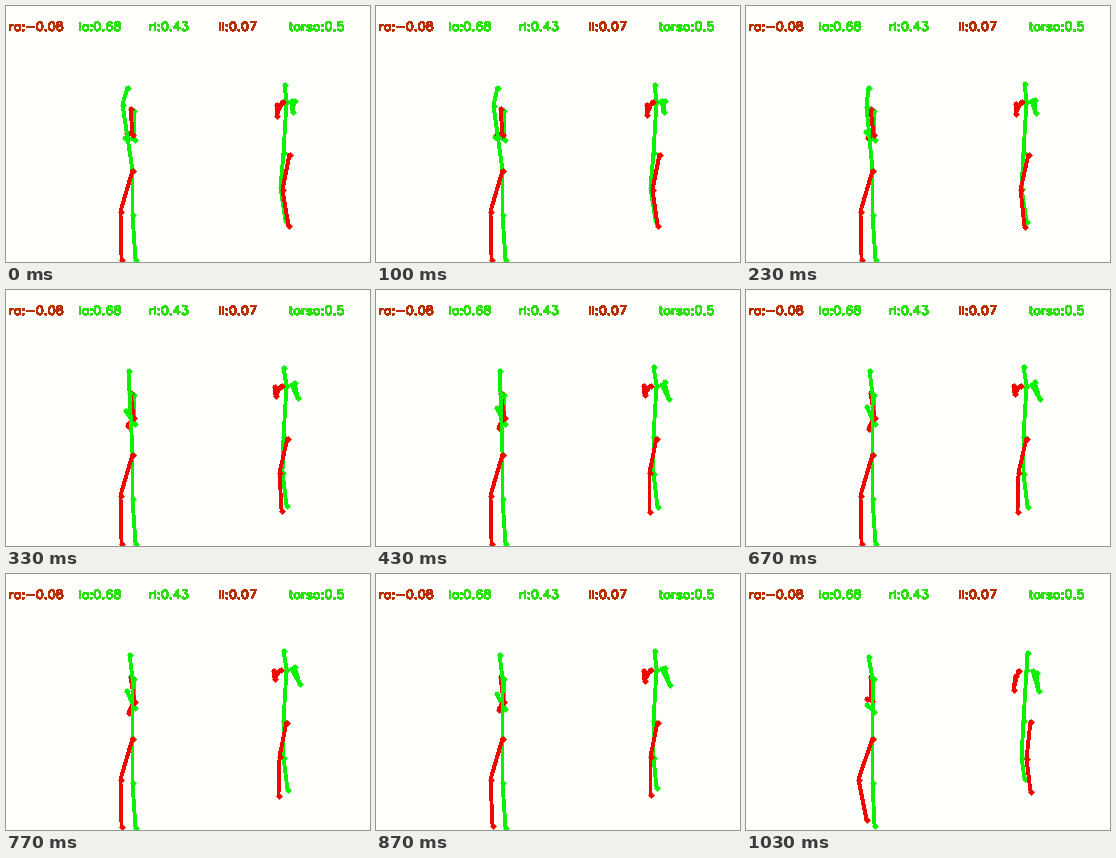
Animation, 364 px wide and 256 px high, one loop 1.06 s. Source, as a matplotlib script:

```python
import numpy as np
import matplotlib.pyplot as plt
from matplotlib.animation import FuncAnimation

W, H, DPI = 364, 256, 100
PX = 72 / DPI
TICKS, TICK_MS = 106, 10
STEPS = 32

RED, GREEN = "#f00800", "#0cf004"
TEXT_RED, TEXT_GREEN = "#b83004", "#2ce010"

fig = plt.figure(figsize=(W / DPI, H / DPI), dpi=DPI, facecolor="#fffffb")
ax = fig.add_axes([0, 0, 1, 1])
ax.set(xlim=(0.5, W + 0.5), ylim=(H + 0.5, 0.5))
ax.axis("off")


# --- single-stroke plotter lettering, 21 units tall ---

def arc(cx, cy, rx, ry, start=0, end=360):
    a = np.radians(np.linspace(start, end, 17))
    return list(zip(cx + rx * np.cos(a), cy + ry * np.sin(a)))


def dot(x, y):
    return arc(x, y, 1, 1)


# advance width, then strokes
GLYPHS = {
    "0": (20, arc(10, 10.5, 7, 10.5)),
    "3": (20, [(5, 21), (16, 21), (10, 13)] + arc(10, 6.5, 7, 6.5, 90, -155)),
    "4": (20, [(13, 0), (13, 21), (3, 7), (18, 7)]),
    "5": (20, [(15, 21), (5, 21), (4, 12)] + arc(10, 7, 7, 7, 130, -155)),
    "6": (20, arc(11, 11, 7, 10, 45, 180) + arc(10.5, 6.5, 6.5, 6.5, 180, 540)),
    "7": (20, [(3, 21), (17, 21), (7, 0)]),
    "8": (20, arc(10, 16.5, 6, 4.5), arc(10, 6, 7, 6)),
    ".": (10, dot(5, 1)),
    ":": (10, dot(5, 13), dot(5, 1)),
    "-": (26, [(4, 9), (22, 9)]),
    "a": (19, [(15, 14), (15, 0)], arc(9.5, 7, 6.5, 7, 35, 325)),
    "i": (8, dot(4, 21), [(4, 14), (4, 0)]),
    "l": (8, [(4, 21), (4, 0)]),
    "o": (19, arc(9.5, 7, 6.5, 7)),
    "r": (13, [(4, 14), (4, 0)], arc(11, 8, 7, 6, 180, 80)),
    "s": (17, arc(8.5, 10.7, 5.5, 3.3, 15, 255) + arc(8.5, 3.6, 5.5, 3.6, 70, -165)),
    "t": (12, [(5, 21), (5, 4), (6, 1), (8, 0), (10, 0)], [(2, 14), (9, 14)]),
}


def write(text, x, y, color, scale=0.4):
    for ch in text:
        advance, *strokes = GLYPHS[ch]
        for stroke in strokes:
            p = np.array(stroke) * scale
            ax.plot(x + p[:, 0], y - p[:, 1], color=color, lw=1.3 * PX,
                    solid_capstyle="butt", snap=False, antialiased=False)
        x += advance * scale


LABELS = ["ra:-0.08", "la:0.68", "rl:0.43", "ll:0.07", "torso:0.5"]
for i, label in enumerate(LABELS):
    write(label, 3 + 70 * i, 25, TEXT_RED if i in (0, 3) else TEXT_GREEN)


# --- skeletons ---

limbs = []


def joint(x, y, start=(0, 0), end=(0, 0)):
    """Position in the middle of the move, with offsets at its two ends."""
    def at(u):
        leave = np.cos(np.pi * u / 2) ** 8
        arrive = u ** 8
        return (x + leave * start[0] + arrive * end[0],
                y + leave * start[1] + arrive * end[1])
    return at


def limb(color, *joints):
    line, = ax.plot([], [], color=color, lw=2.8 * PX, marker="D",
                    ms=4.9 * PX, mew=0, solid_capstyle="round",
                    antialiased=False)
    limbs.append((line, joints))


# side view
hip = joint(127, 165)
limb(GREEN, joint(128, 105), joint(129, 134, end=(-1, 4)),
     joint(121, 116, (-2, 16), (0, 15)))
limb(RED, joint(125, 103), joint(129, 128, (-2, 1), (-3, -1)),
     joint(123, 140, (-2, -13), (-2, -15)))
limb(GREEN, joint(124, 81, (-2, 1), (-1, 2)), joint(127, 105, (-10, -6)), hip)
limb(GREEN, hip, joint(127, 209), joint(130, 254, end=(-1, -2)))
limb(RED, hip, joint(115, 206, end=(-2, 0)), joint(116, 254, end=(5, -8)))

# front view
hip = joint(278, 147)
limb(GREEN, joint(278, 77, (1, 2), (4, 2)), joint(281, 96), hip)
limb(GREEN, joint(286, 95, end=(1, 2)), joint(294, 109, (-7, -3), (-1, 8)),
     joint(289, 92, (0, 3), (2, 7)))
limb(RED, joint(275, 96, (2, 0), (-2, 1)), joint(269, 104, (2, 6), (-1, 12)),
     joint(268, 96, (3, 3), (2, 6)))
limb(GREEN, hip, joint(278, 184, (-3, -2), (-2, 0)),
     joint(282, 217, (-2, -2), (-3, -12)))
limb(RED, joint(281, 149, (3, 0), (4, -1)), joint(273, 183, (4, 1), (8, 2)),
     joint(272, 222, (11, -2), (13, -4)))


def update(tick):
    u = int((tick + 0.5) * 0.3) / (STEPS - 1)
    for line, joints in limbs:
        line.set_data(*np.round([j(u) for j in joints]).T)
    return [line for line, _ in limbs]


anim = FuncAnimation(fig, update, frames=TICKS, interval=TICK_MS,
                     repeat=True, repeat_delay=0, blit=False)
plt.show()
```
